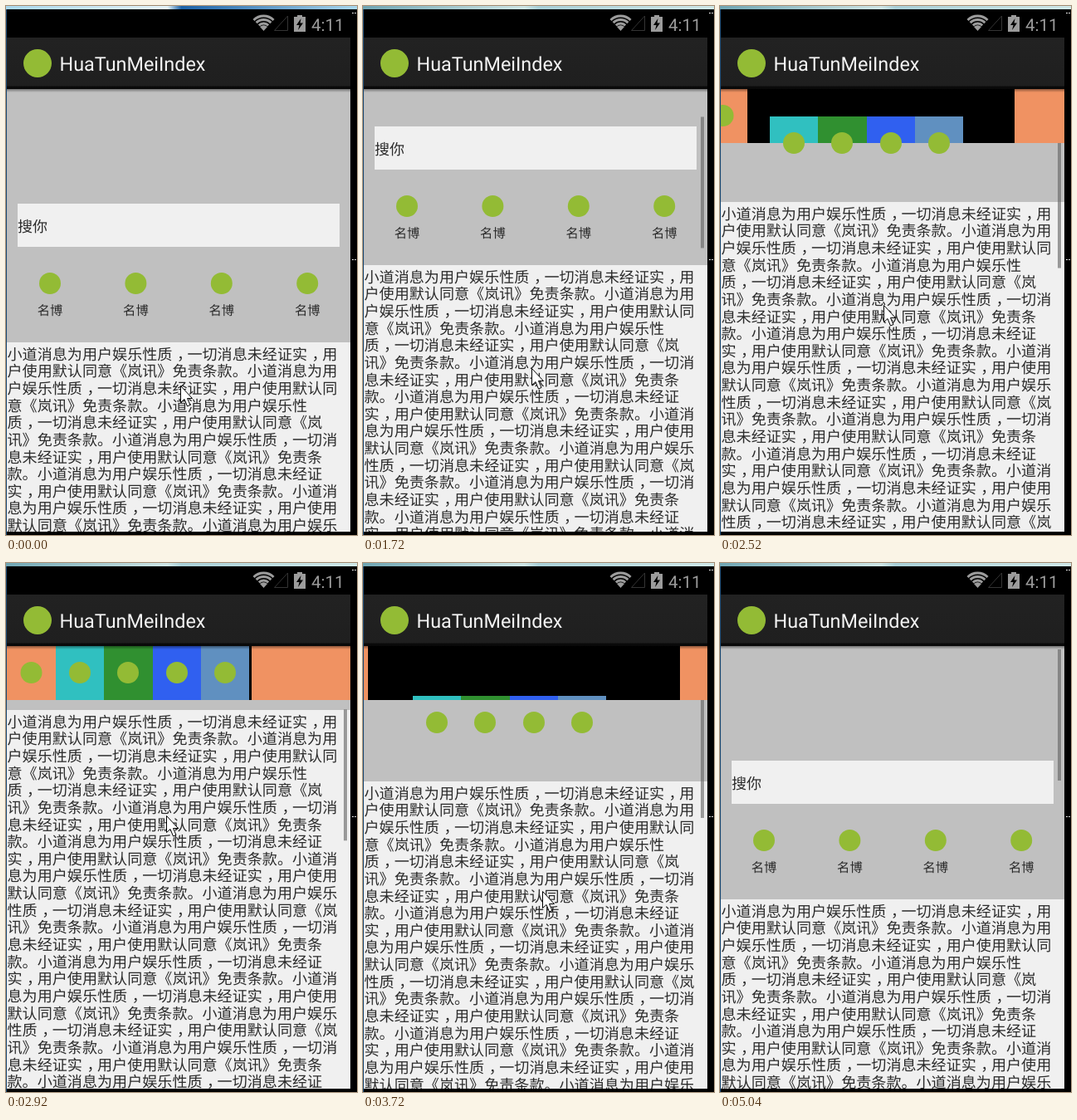
Animation of 423 by 637 pixels, one loop 5240 ms. Source, as an HTML page with a canvas:

```html
<!DOCTYPE html>
<html lang="zh-CN">
<head>
<meta charset="utf-8">
<style>
html, body { margin: 0; width: 100%; height: 100%; overflow: hidden; background: #000; }
canvas { display: block; }
</style>
</head>
<body>
<canvas id="stage" width="423" height="637"></canvas>
<script>
const ctx = document.getElementById('stage').getContext('2d');
const LOOP = 5240, TOP = 100, BOTTOM = 633, LEFT = 1, RIGHT = 415;
const BAR = 65, PIN = 138, PANEL = 305, EM = 18.08;
const CJK = '"Noto Sans CJK SC", "Noto Sans CJK", sans-serif';
const GREEN = '#93bb35', ORANGE = '#f09262';
const TILES = ['#30c0c0', '#309030', '#3060f0', '#6090c0'];
const tileX = i => 60 + Math.round(i * 58.3);

// Lines break only between two ideographs, never beside punctuation.
const lines = '小道消息为用户娱乐性质，一切消息未经证实，用户使用默认同意《岚讯》免责条款。'
  .repeat(24).match(/.{1,22}(?<![，。《》])(?![，。《》])/g);

// time, pointer x, pointer y, scroll
const keys = [
  [0, 210, 457, 0], [300, 179, 423, 0], [620, 204, 506, 0], [1020, 208, 526, 0],
  [1120, 208, 526, 0], [1220, 207, 515, 11], [1720, 203, 436, 93], [2020, 200, 403, 127],
  [2520, 197, 360, 169], [2920, 193, 304, 228], [3320, 191, 331, 212],
  [3720, 216, 395, 142], [4220, 246, 490, 45], [4840, 246, 512, 25],
  [4940, 246, 533, 6], [5040, 246, 540, 0]
];

function sample(t) {
  const i = keys.findIndex(k => k[0] > t);
  if (i < 0) return keys.at(-1).slice(1);
  const a = keys[i - 1], b = keys[i], p = (t - a[0]) / (b[0] - a[0]);
  return [1, 2, 3].map(n => a[n] + (b[n] - a[n]) * p);
}

function step(t) {
  const shift = t < 520 ? 0 : t < 4740 ? 20 : 40;
  return Math.floor((t - shift) / 100) * 100 + shift;
}

function rect(x, y, w, h, color) {
  ctx.fillStyle = color;
  ctx.fillRect(x, y, w, h);
}

function clip(x, y, w, h, draw) {
  ctx.save();
  ctx.beginPath();
  ctx.rect(x, y, w, h);
  ctx.clip();
  draw();
  ctx.restore();
}

function dot(x, y, r) {
  ctx.fillStyle = GREEN;
  ctx.beginPath();
  ctx.arc(x, y, r, 0, 7);
  ctx.fill();
}

function text(str, x, y, size, color = '#2b2b2b', family = CJK) {
  ctx.font = `${size}px ${family}`;
  ctx.fillStyle = color;
  ctx.fillText(str, x, y);
}

// Body copy sits on a square grid, with commas centred in their cells.
function gridText(str, x, y) {
  [...str].forEach((c, i) => text(c, x + i * EM + (c === '，' ? 5.5 : 0), y, EM));
}

function gradient(x, y, w, h, stops, vertical) {
  const g = ctx.createLinearGradient(x, y, vertical ? x : x + w, vertical ? y + h : y);
  stops.forEach(([at, color]) => g.addColorStop(at, color));
  rect(x, y, w, h, g);
}

function shape(d, fill, stroke) {
  const path = new Path2D(d);
  if (fill) { ctx.fillStyle = fill; ctx.fill(path); }
  if (stroke) { ctx.strokeStyle = stroke; ctx.lineWidth = 1; ctx.stroke(path); }
}

function desktop(t) {
  rect(0, 0, 423, 637, '#000');
  const tint = t < 720
    ? ['#a9d8ee', '#e6f5fa', '#1c62a8', '#a9d8ee']
    : ['#6fa6b4', '#cfe6e6', '#a9d0d8', '#cfe8e8'];
  gradient(0, 0, 423, 4, [[0, tint[0]], [.46, tint[1]], [.5, tint[2]], [1, tint[3]]]);
  rect(0, 4, 1, 633, '#1c4a74');
  for (const y of [8, 305])
    for (let x = 417; x < 423; x += 3) rect(x, y, 2, 1, '#e8e8e8');
}

function chrome() {
  const grey = '#9c9c9c';
  ctx.strokeStyle = grey;
  ctx.lineWidth = 3;
  for (const r of [8, 12.5, 17]) {
    ctx.beginPath();
    ctx.arc(310.5, 29, r, -Math.PI * .75, -Math.PI * .25);
    ctx.stroke();
  }
  shape('M310.5 30L306 25Q310.5 21.500 315 25Z', grey);
  shape('M323.500 29.500L339.500 12V29.500Z', null, '#343434');
  shape('M347 13H351V11H357V13H361V31H347Z', grey);
  shape('M355.500 15L350 23H353.500L352 29L358 20.500H354.500Z', '#000');
  text('4:11', 368, 29.5, 20.5, grey, 'Roboto, sans-serif');

  gradient(LEFT, 38, RIGHT - LEFT, 62, [[0, '#222'], [.93, '#1f1f1f'], [.96, '#0a0a0a'], [1, '#080808']], true);
  dot(38, 69, 17);
  text('HuaTunMeiIndex', 64.5, 77.5, 23.4, '#f3f3f3', 'Roboto, sans-serif');
}

function panel(scroll) {
  const y = TOP - scroll;
  rect(LEFT, y, RIGHT - LEFT, PANEL, '#c0c0c0');
  if (scroll >= PIN) return;
  rect(14, y + 138, 388, 52, '#f0f0f0');
  text('搜你', 14, y + 171.5, 18);
  for (let i = 0; i < 4; i++) {
    const x = 53 + i * 103.4;
    dot(x, y + 234, 13);
    text('名博', x - 15.3, y + 271.5, 15.3);
  }
}

function pinnedBar(scroll) {
  const moved = scroll - PIN;
  const drop = Math.max(0, BAR - 1 - moved);
  const slide = Math.min(0, moved - 58);
  const rightEdge = Math.max(tileX(4), 386 - moved);
  clip(LEFT, TOP, RIGHT - LEFT, BAR, () => {
    rect(LEFT, TOP, RIGHT - LEFT, BAR, '#000');
    rect(LEFT + slide, TOP, 59, BAR, ORANGE);
    rect(rightEdge, TOP, RIGHT - rightEdge, BAR, ORANGE);
    TILES.forEach((c, i) => rect(tileX(i), TOP + drop, tileX(i + 1) - tileX(i), BAR, c));
  });
  dot(30.5 + slide, 132, 13);
  TILES.forEach((_, i) => dot(tileX(i) + 29, 132 + drop, 13));
}

function page(t, scroll) {
  rect(LEFT, TOP, RIGHT - LEFT, BOTTOM - TOP, '#f0f0f0');
  panel(scroll);
  lines.forEach((line, i) => {
    const y = TOP + PANEL + 20.6 + i * 20.65 - scroll;
    if (y < BOTTOM + 20) gridText(line, 1.5, y);
  });
  if (t >= 1120) rect(407, 104 + scroll * .317, 4, 158, 'rgba(95,95,95,.6)');
  if (scroll >= PIN) pinnedBar(scroll);
  gradient(LEFT, TOP, RIGHT - LEFT, 4, [[0, 'rgba(0,0,0,.4)'], [1, 'rgba(0,0,0,0)']], true);
}

function pointer(x, y) {
  ctx.save();
  ctx.translate(x + .5, y + .5);
  shape('M0 0V20L4.500 16L8 24.500L11.500 23L8 15H14Z', '#fff', '#000');
  ctx.restore();
}

function frame(now) {
  const t = Math.max(0, step(now % LOOP));
  const [x, y, rawScroll] = sample(t);
  const scroll = Math.round(rawScroll);
  ctx.textRendering = 'geometricPrecision';
  desktop(t);
  chrome();
  clip(LEFT, TOP, RIGHT - LEFT, BOTTOM - TOP, () => page(t, scroll));
  if (t < 5040) pointer(Math.round(x), Math.round(y));
  requestAnimationFrame(frame);
}
requestAnimationFrame(frame);
</script>
</body>
</html>
```
